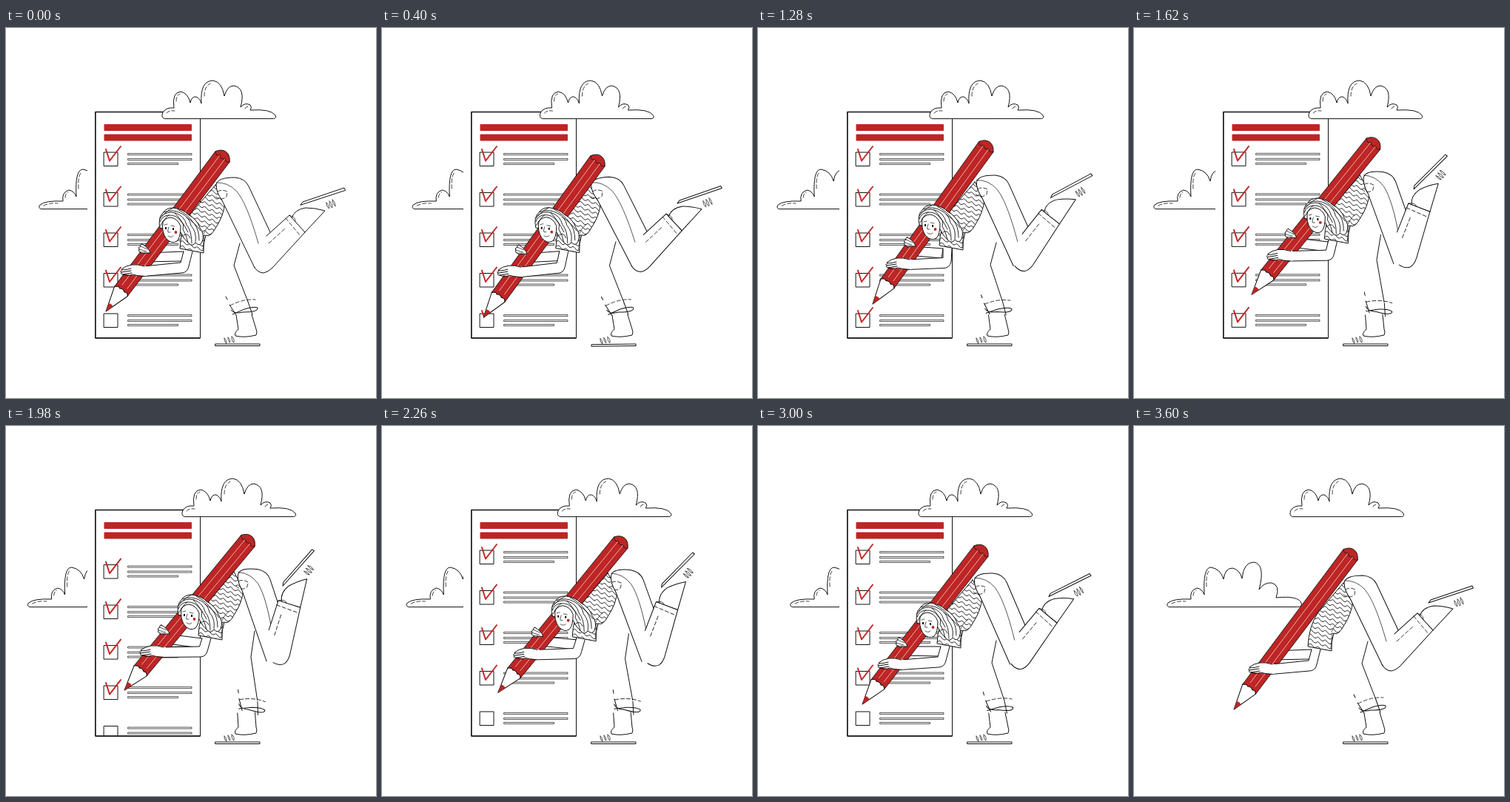
Animation, 500 px wide and 500 px high, one loop 3.62 s. Source, as an HTML page:

```html
<!DOCTYPE html>
<html lang="en">
<head>
<meta charset="utf-8">
<title>Checklist</title>
<style>
html, body { margin: 0; width: 100%; height: 100%; overflow: hidden; background: #fff; }
svg { display: block; width: 100%; height: 100%; }
.ink { fill: #fff; stroke: #111; stroke-width: 1; stroke-linejoin: round; stroke-linecap: round; }
.line { fill: none; }
.thin { fill: none; stroke-width: .7; }
.dash { fill: none; stroke-dasharray: 5 3; stroke-width: .8; }
.red { fill: #be2525; stroke: none; }
.tick { fill: none; stroke: #c62828; stroke-width: 2; }
</style>
</head>
<body>
<svg viewBox="0 0 500 500" class="ink">
  <defs>
    <clipPath id="page"><path d="M122 156H262V418H122Z"/></clipPath>
    <path id="shirt" d="M283 212L296 236Q294 254 284 269Q276 284 270 280Q266 292 267 304L235 298Q236 272 248 253Q264 234 283 212Z"/>
    <clipPath id="cloth"><use href="#shirt"/></clipPath>
  </defs>

  <g id="cloudL">
    <path d="M47 244.500Q43 243 46 239Q53 233 77 234Q75 222 85 219Q92 220 95 228Q93 191 104 191Q117 193 121 207Q123 192 133 192Q143 194 146 206Q148 184 162 184Q178 187 169 221Q176 211 186 212Q198 215 192 232Q222 229 226 239Q228 245 221 244.500Z"/>
    <path class="dash" d="M98 217Q97 199 102 195M80 229Q80 224 84 222M51 240Q59 236 70 237"/>
  </g>

  <g id="list">
    <path stroke="none" d="M110 113.500H262.500V419H110Z"/>
    <path d="M121 113.500H262.500V419H121Z"/>
    <path d="M121 113.500H262M121 113.500V419H262" class="line" stroke-width="1.300"/>
    <rect class="red" x="132.500" y="130" width="118.500" height="9" rx="1"/>
    <rect class="red" x="132.500" y="143.500" width="118.500" height="9" rx="1"/>
    <g clip-path="url(#page)"><g id="items"></g></g>
  </g>

  <g id="cloudR">
    <path d="M214 122.500Q209 121 212 114Q216 107 227 108Q224 87 236 86Q246 88 249 101Q251 92 257 93Q262 95 264 102Q262 71 280 71Q292 73 295 92Q299 78 308 78Q324 81 317 107Q323 100 330 104Q333 107 330 111Q358 109 364 118Q366 122 362 122.500Z"/>
    <path class="dash" d="M268 92Q268 79 276 75M230 99Q230 91 235 89M217 115Q220 111 228 112M323 109Q324 106 328 106"/>
  </g>

  <path id="backLeg" class="line"/>
  <g id="cuff">
    <path class="line" d="M297 363L299 367M302 374L311 388M304 381Q308 387 320 384Q342 384 340 378Q335 376 322 380L306 387"/>
    <path class="dash" d="M303 375Q320 366 337 367" stroke-width="1.100"/>
    <path class="line" d="M327 370L333 387"/>
  </g>
  <path id="ankle"/>
  <g id="backShoe">
    <path d="M283 427H343V429.500H283Z"/>
    <path class="thin" d="M295 419q3 2 3 7q-3-1-3-7M300 418q3 2 3 7q-3-1-3-7M305 417q4 2 3 8q-3-1-3-8"/>
  </g>

  <path id="backArm"/>
  <g id="torso">
    <use href="#shirt"/>
    <g clip-path="url(#cloth)"><path id="stripes" class="line" stroke-width=".9"/></g>
    <path class="thin" d="M267 278Q270 270 276 266M268 280L266 300"/>
  </g>

  <g id="thigh">
    <path d="M336 324L292 233Q284 222 284 212C285 205 294 202 309 202Q323 203 328 214L358 278"/>
    <path class="thin" d="M284 209Q300 208 312 221Q326 238 341 291"/>
    <path class="dash" d="M283 228Q291 234 298 228L299 221Q290 217 285 222"/>
  </g>
  <g id="shin">
    <path d="M386 257Q390 245 405 243Q418 243 431 247L404 276Z"/>
    <path d="M335 322Q340 331 348 331Q354 330 360 324L404 276L383 253L352 281"/>
    <path class="dash" d="M378 257L398 281M355 291L377 271"/>
    <path class="thin" d="M383 253Q392 256 391 261"/>
    <path d="M398 239L401 235L457 216L458.500 219Z"/>
    <path class="thin" d="M433 236q4 3 4 8q-4-2-4-8M437 234q4 3 4 9q-4-2-4-9M441 232q4 3 4 9q-4-3-4-9"/>
  </g>

  <g id="pencil">
    <path d="M0 0L34-11Q39-6 36-4Q39 0 36 4Q39 8 34 11Z"/>
    <path class="red" d="M0 0L11-3.600Q13 0 11 3.600Z"/>
    <path fill="#be2525" stroke-width=".8" d="M34-11L262-12Q270-7 270 0Q270 7 262 12L34 11Q39 8 36 4Q39 0 36-4Q39-6 34-11Z"/>
    <path class="line" stroke="#edb0ad" stroke-width=".9" d="M42-4H262M42 4.500H262"/>
    <path class="thin" d="M262-12Q256-7 262-4Q256 0 262 4.500Q257 8 262 12"/>
  </g>

  <g id="grip">
    <path d="M184 292Q181 292 182 295Q178 296 180 299Q178 302 182 303Q183 306 188 304L195 304Q193 297 184 292Z"/>
    <path class="thin" d="M182 295L191 299M180 299L190 302M182 303H188"/>
  </g>

  <path id="arm"/>
  <g id="hand">
    <path stroke="none" d="M190 322L186 321Q172 318 166 321L156 326L155 332L170 334L190 335Z"/>
    <path class="line" d="M187 322Q178 319 170 320Q162 321 156 326Q158 328 169 325M157 327Q153 329 156 330L169 328M156 330Q154 332 157 333L170 331M158 333Q165 336 171 333Q177 335 186 335.500"/>
  </g>

  <g id="head">
    <path d="M208 270Q205 256 212 250Q216 243 226 243Q240 245 246 252Q258 258 262 270Q269 279 265 289Q262 296 256 290Q252 296 247 291Q240 285 236 276Z"/>
    <path d="M212 262Q210 275 216 284Q224 293 231 288Q236 283 236 268Q232 257 222 256Q215 257 212 262Z"/>
    <path class="line" stroke-width=".9" d="M208 262Q211 254 219 253Q231 252 237 262Q241 265 239 272Q244 280 246 290M210 254Q218 247 229 250Q241 254 244 266Q251 274 251 291M213 249Q226 244 238 251Q248 256 250 267Q258 276 256 289M226 243Q215 248 208 258M232 245Q246 252 254 264Q261 272 261 287M220 253Q214 257 209 267M244 256Q254 262 263 274M228 250Q238 260 246 276M240 280Q246 276 249 284"/>
    <path class="thin" d="M214 266L218 265M223 267L228 268M220 269Q218 274 219 276L222 276M219 281Q223 284 226 281"/>
    <path fill="#111" stroke="none" d="M215 269h2v3h-2ZM225 270h2v3h-2Z"/>
    <circle class="red" cx="229.500" cy="276" r="1.900"/>
  </g>
</svg>

<script>
const $ = id => document.getElementById(id);
const LOOP = 3620, ROW = 54.5;

// Monotone cubic through (times, values), at rest at both ends.
function track(times, values) {
  const n = times.length - 1;
  const slope = i => (values[i + 1] - values[i]) / (times[i + 1] - times[i]);
  const tangent = times.map((_, i) => {
    if (i === 0 || i === n) return 0;
    const a = slope(i - 1), b = slope(i);
    return a * b > 0 ? 2 * a * b / (a + b) : 0;
  });
  return t => {
    let i = 0;
    while (i < n - 1 && t >= times[i + 1]) i++;
    const h = times[i + 1] - times[i], u = (t - times[i]) / h, v = 1 - u;
    return values[i] * (1 + 2 * u) * v * v + values[i + 1] * u * u * (3 - 2 * u)
      + h * u * v * (tangent[i] * v - tangent[i + 1] * u);
  };
}

// Six key poses spread over the loop, with holds and a fast lean.
const POSE_TIMES = [0, 250, 780, 1080, 1280, 1640, 1980, 2540, 3000, LOOP];
const pose = (a, b, c, d, e, f) =>
  track(POSE_TIMES, [a, a, b, b + (c - b) * .15, c, c + (d - c) * .84, d, e, f, a]);
const point = (xs, ys) => {
  const x = pose(...xs), y = pose(...ys);
  return t => [x(t), y(t)];
};

const body = point([0, -1, 10, 25, 17, 7], [0, -2, -4, -15, -10, -4]);
const hand = point([0, 6, 18, 26, 17, 7], [0, 6, -9, -23, -14, -6]);
const hip = point([306, 301, 317, 334, 324, 314], [224, 220, 221, 215, 218, 221]);
const knee = point([346, 354, 355.6, 363.5, 360, 351], [308, 300, 306, 302, 305, 306]);
const backTop = point([316, 316, 322, 336, 329, 322], [291, 280, 290, 277, 286, 290]);
const backKnee = point([308, 305, 314, 331, 324, 316], [321, 322, 320, 312, 318, 320]);
const shinTurn = pose(0, -3, -9.5, -30, -21, -8);
const cuffTurn = pose(0, -3, 5, 18, 14, 8);
const shoeTurn = pose(0, -4, 0, 0, 0, 0);
const pencilTurn = pose(-53, -57.4, -54.2, -50.4, -51.2, -52.2);

const TIP_TIMES = [0, 250, 520, 780, 1000, 1280, 1640, 1980, 2540, 3000, LOOP];
const tipX = track(TIP_TIMES, [135, 135, 140, 148, 155, 155, 159, 160, 151, 141, 135]);
const tipY = track(TIP_TIMES, [383, 383, 397, 388, 378, 373, 360, 357, 366, 376, 383]);
const cloudL = track([0, 540, 780, 1100, 1640, 2180, 2540, 3000, 3260, LOOP],
  [0, -6, -16, -19, -18, -13, -6, -1, 0, 0]);
const cloudR = track([0, 780, 1280, 1980, 2540, 3000, LOOP], [0, 7.5, 21, 27, 24.5, 6, 0]);
const scroll = track([0, 1600, 2240, LOOP], [0, 0, ROW, ROW]);

for (let i = 0; i < 6; i++) {
  $('items').innerHTML += `<g transform="translate(0 ${168 + i * ROW})">
    <path class="line" d="M132.500 0H151V18.500H132.500Z"/>
    <path class="thin" stroke-width=".6" d="M165 1.500h86v2h-86ZM165 8.500h86v2h-86ZM165 14.500h67.500v2h-67.500Z"/>
    ${i < 5 ? `<path class="tick" ${i === 4 ? 'id="newTick"' : ''} d="M135-4L140 11.500L155-8"/>` : ''}</g>`;
}

// Wavy shirt stripes, sloping down to the right.
let stripes = '';
for (let y = 210; y < 310; y += 6.5) {
  stripes += `M226 ${y - 16}` + 'q2.500-3 5 1t5 3'.repeat(8);
}
$('stripes').setAttribute('d', stripes);

const move = (id, value) => $(id).setAttribute('transform', value);
const shift = (id, [x, y]) => move(id, `translate(${x} ${y})`);
const hinge = (id, [x, y], turn, [px, py]) =>
  move(id, `translate(${x} ${y}) rotate(${turn}) translate(${-px} ${-py})`);
const add = ([a, b], x, y) => `${a + x} ${b + y} `;

function draw(t) {
  const b = body(t), h = hand(t), e = [(b[0] + h[0]) / 2, (b[1] + h[1]) / 2];
  const hp = hip(t), kn = knee(t), c = cuffTurn(t), x = tipX(t);

  shift('cloudL', [cloudL(t), 0]);
  shift('cloudR', [cloudR(t), 0]);
  shift('items', [0, -scroll(t)]);
  shift('torso', b);
  shift('head', b);
  shift('hand', h);
  shift('grip', h);
  move('pencil', `translate(${x} ${tipY(t)}) rotate(${pencilTurn(t)})`);

  const lean = Math.atan2(kn[1] - hp[1], kn[0] - hp[0]) - Math.atan2(84, 40);
  hinge('thigh', hp, lean * 180 / Math.PI, [306, 224]);
  hinge('shin', kn, shinTurn(t), [346, 308]);
  hinge('cuff', [326, 412], c, [326, 412]);
  hinge('backShoe', [343, 426], shoeTurn(t), [343, 426]);

  $('backLeg').setAttribute('d',
    `M${backTop(t)}L${backKnee(t)}L${327 + c * .7} ${370 + c * .02}`);
  $('ankle').setAttribute('d', `M${311 + c * .1} 388L314 407Q308 412 310 416Q322 419 338 415
    Q340 411 338 407L${332 + c * .25} 387`);
  $('backArm').setAttribute('d', `M${add(h, 190, 304)}L${add(b, 240, 302)}L${add(b, 238, 315)}L${add(h, 184, 316)}`);
  $('arm').setAttribute('d', `M${add(b, 240, 302)}L${add(e, 236, 317)}L${add(h, 186, 322)}L${add(h, 186, 335.5)}
    L${add(e, 237, 331)}Q${add(e, 245, 331)}${add(e, 247, 322)}L${add(b, 252, 302)}`);

  const length = t >= 1000 ? 60 : x < 140 ? (x - 135) * 3.25 : 16.3 + (x - 140) * 1.64;
  $('newTick').style.strokeDasharray = `${length} 99`;
  $('newTick').style.visibility = length > .1 ? '' : 'hidden';

  // The page and head blink out just before the loop restarts.
  for (const id of ['list', 'head', 'grip']) $(id).style.display = t >= 3600 ? 'none' : '';
}

const start = performance.now();
function tick() {
  draw((performance.now() - start) % LOOP);
  requestAnimationFrame(tick);
}
tick();
</script>
</body>
</html>
```
